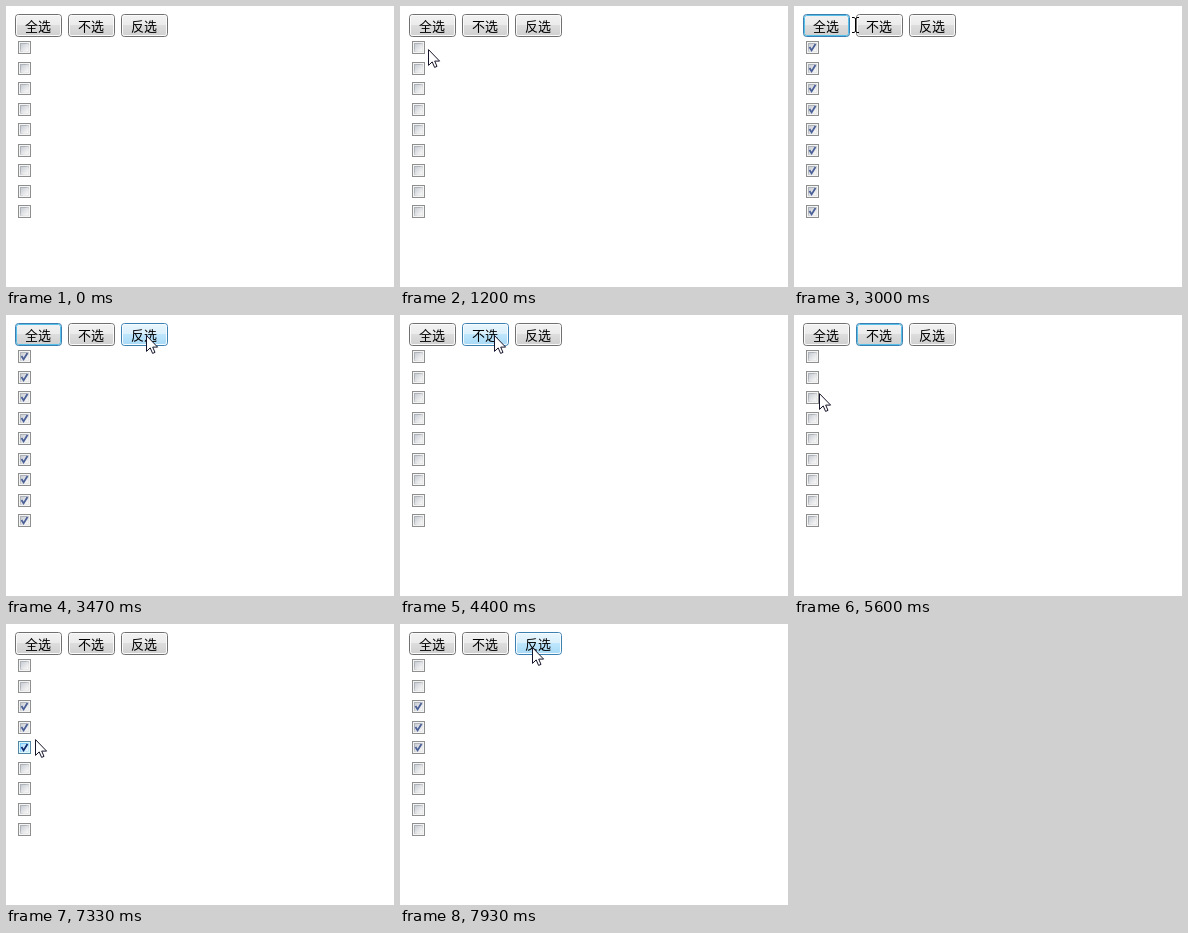
Recreate the animation shown at these times as an HTML page. Size 388 by 281 pixels, loop 8000 ms.

```html
<!DOCTYPE html>
<html lang="zh-CN">
<head>
<meta charset="utf-8">
<title>全选 / 不选 / 反选</title>
<style>
  html, body { margin: 0; width: 100%; height: 100%; overflow: hidden; background: #fff; }
  svg { display: block; width: 388px; height: 281px; }
  text { font: 13px "Noto Sans CJK SC", "Noto Sans CJK", sans-serif; text-anchor: middle; fill: #000; }
</style>
</head>
<body>
<svg id="stage" viewBox="0 0 388 281" xmlns="http://www.w3.org/2000/svg"><defs id="defs"></defs></svg>
<script>
const LOOP = 8000, TICK = 1000 / 15;
const stage = document.getElementById('stage');
const defs = document.getElementById('defs');

function set(el, attrs) {
  for (const name in attrs) el.setAttribute(name, attrs[name]);
}
function add(parent, tag, attrs) {
  const el = document.createElementNS('http://www.w3.org/2000/svg', tag);
  set(el, attrs);
  parent.appendChild(el);
  return el;
}
function gradient(id, stops, diagonal) {
  const g = add(defs, 'linearGradient', { id, x1: 0, y1: 0, x2: diagonal ? 1 : 0, y2: 1 });
  for (const [offset, color] of stops) add(g, 'stop', { offset, 'stop-color': color });
}

const gray = ['#f2f2f2', '#ebebeb', '#dddddd', '#cfcfcf'];
const buttonLooks = {
  normal: { edge: '#707070', rim: '#fbfbfb', fill: gray },
  focus: { edge: '#3c7fb1', rim: '#56bfea', fill: gray },
  hover: { edge: '#3c7fb1', rim: '#f8fcfe', fill: ['#eaf6fd', '#d9f0fc', '#bee6fd', '#a7d9f5'] },
  pressed: { edge: '#2c628b', rim: '#9eb0ba', fill: ['#e5f4fc', '#c4e5f6', '#98d1ef', '#68b3db'] }
};
const boxLooks = {
  normal: { edge: '#8e8f8f', ring: '#f4f4f4', inner: ['#aeb3b9', '#e9e9ea'], fill: ['#cbcfd5', '#f6f6f6'], tick: '#4a5f97' },
  hover: { edge: '#5586a3', ring: '#def9fa', inner: ['#79c6f9', '#c6e9fc'], fill: ['#b1dffd', '#e9f7fe'], tick: '#0b2a70' },
  pressed: { edge: '#2c628b', ring: '#c2e4f6', inner: ['#5eb6f7', '#bce3fa'], fill: ['#8fcbf5', '#d5eefc'], tick: '#0b2a70' }
};
for (const name in buttonLooks) {
  const [a, b, c, d] = buttonLooks[name].fill;
  gradient('button-' + name, [[0, a], [0.5, b], [0.5, c], [1, d]]);
}
for (const name in boxLooks) {
  const { inner, fill } = boxLooks[name];
  gradient('inner-' + name, [[0.3, inner[0]], [0.7, inner[1]]], true);
  gradient('box-' + name, [[0.1, fill[0]], [0.9, fill[1]]], true);
}

const buttons = ['全选', '不选', '反选'].map((label, i) => {
  const x = 9 + 53 * i, y = 8;
  const g = add(stage, 'g', { transform: `translate(${x} ${y})` });
  const edge = add(g, 'rect', { x: 0.5, y: 0.5, width: 46, height: 22, rx: 3 });
  const rim = add(g, 'rect', { x: 1.5, y: 1.5, width: 44, height: 20, rx: 2, fill: 'none' });
  add(g, 'text', { x: 23, y: 17 }).textContent = label;
  return { x, y, w: 47, h: 23, edge, rim };
});

const boxes = Array.from({ length: 9 }, (_, i) => {
  const x = 12, y = Math.round(35 + 20.5 * i);
  const g = add(stage, 'g', { transform: `translate(${x} ${y})` });
  const edge = add(g, 'rect', { x: 0.5, y: 0.5, width: 12, height: 12 });
  const inner = add(g, 'rect', { x: 2.5, y: 2.5, width: 8, height: 8 });
  const tick = add(g, 'path', { d: 'M3.5 6 L5.6 9.4 L9.5 3', fill: 'none', 'stroke-width': 1.8 });
  return { x, y, w: 13, h: 13, edge, inner, tick };
});

const arrow = add(stage, 'path', {
  d: 'M.5 .6 V16.4 L4.2 12.9 L6.6 18.4 L9 17.4 L6.7 12.1 H11.6 Z',
  fill: '#fff', stroke: '#14142a', 'stroke-width': 1
});
const beam = add(stage, 'path', {
  d: 'M-3 -7.5 H-1 L.5 -6.5 L2 -7.5 H4 M.5 -6.5 V6.5 M-3 7.5 H-1 L.5 6.5 L2 7.5 H4',
  fill: 'none', stroke: '#000', 'stroke-width': 1
});

// The pointer shows up, then glides from stop to stop
const entry = { tick: 5, x: 308, y: 245 };
const glides = [];
function glide(from, to, x, y) { glides.push({ from, to, x, y }); }
glide(5, 6, 307, 242);
glide(8, 18, 28, 43);
glide(18, 22, 28, 19);
glide(41, 52, 140, 20);
glide(56, 60, 94, 20);
glide(76, 84, 25, 78);
glide(84, 85, 25, 80);
glide(87, 89, 20, 81);
glide(92, 96, 20, boxes[3].y + 6);
glide(98, 103, 19, boxes[4].y + 10);
glide(108, 110, 29, 115);
glide(110, 119, 132, 23);

const clicks = [
  { down: 29, up: 31, on: buttons[0] },
  { down: 63, up: 66, on: buttons[1] },
  { down: 91, up: 92, on: boxes[2] },
  { down: 97, up: 98, on: boxes[3] },
  { down: 106, up: 107, on: boxes[4] }
];

const ease = u => (1 - Math.cos(Math.PI * u)) / 2;

function pointer(k) {
  if (k < entry.tick) return null;
  let { x, y } = entry;
  for (const g of glides) {
    const u = ease(Math.min(1, Math.max(0, (k - g.from) / (g.to - g.from))));
    x += (g.x - x) * u;
    y += (g.y - y) * u;
  }
  return { x: Math.round(x), y: Math.round(y) };
}
function hit(p, r) {
  return !!p && p.x >= r.x && p.x < r.x + r.w && p.y >= r.y && p.y < r.y + r.h;
}
function checkedBoxes(k) {
  let checked = boxes.map(() => false);
  for (const { up, on } of clicks) {
    if (k < up) break;
    if (on === buttons[0]) checked = checked.map(() => true);
    else if (on === buttons[1]) checked = checked.map(() => false);
    else checked[boxes.indexOf(on)] = !checked[boxes.indexOf(on)];
  }
  return checked;
}

function draw(time) {
  const k = Math.floor((time % LOOP + 5) / TICK);
  const p = pointer(k), before = pointer(k - 2);
  const last = clicks.filter(c => k >= c.down).pop();
  const pressed = last && k < last.up ? last.on : null;
  const checked = checkedBoxes(k);

  for (const b of buttons) {
    const name = b === pressed ? 'pressed' : hit(p, b) ? 'hover'
      : last && b === last.on ? 'focus' : 'normal';
    set(b.edge, { stroke: buttonLooks[name].edge, fill: `url(#button-${name})` });
    set(b.rim, { stroke: buttonLooks[name].rim });
  }

  boxes.forEach((b, i) => {
    // The highlight lingers briefly after the pointer has left
    const name = b === pressed ? 'pressed' : hit(p, b) || hit(before, b) ? 'hover' : 'normal';
    const look = boxLooks[name];
    set(b.edge, { stroke: look.edge, fill: look.ring });
    set(b.inner, { stroke: `url(#inner-${name})`, fill: `url(#box-${name})` });
    set(b.tick, { stroke: look.tick, visibility: checked[i] ? 'visible' : 'hidden' });
  });

  const gaps = buttons.slice(1).map(b => ({ x: b.x - 6, y: b.y, w: 6, h: b.h }));
  const overGap = gaps.some(r => hit(p, r));
  set(arrow, { visibility: p && !overGap ? 'visible' : 'hidden' });
  set(beam, { visibility: overGap ? 'visible' : 'hidden' });
  if (p) set(overGap ? beam : arrow, { transform: `translate(${p.x} ${p.y})` });
}

const start = performance.now();
function loop(now) {
  draw(Math.max(0, now - start));
  requestAnimationFrame(loop);
}
draw(0);
requestAnimationFrame(loop);
</script>
</body>
</html>
```
